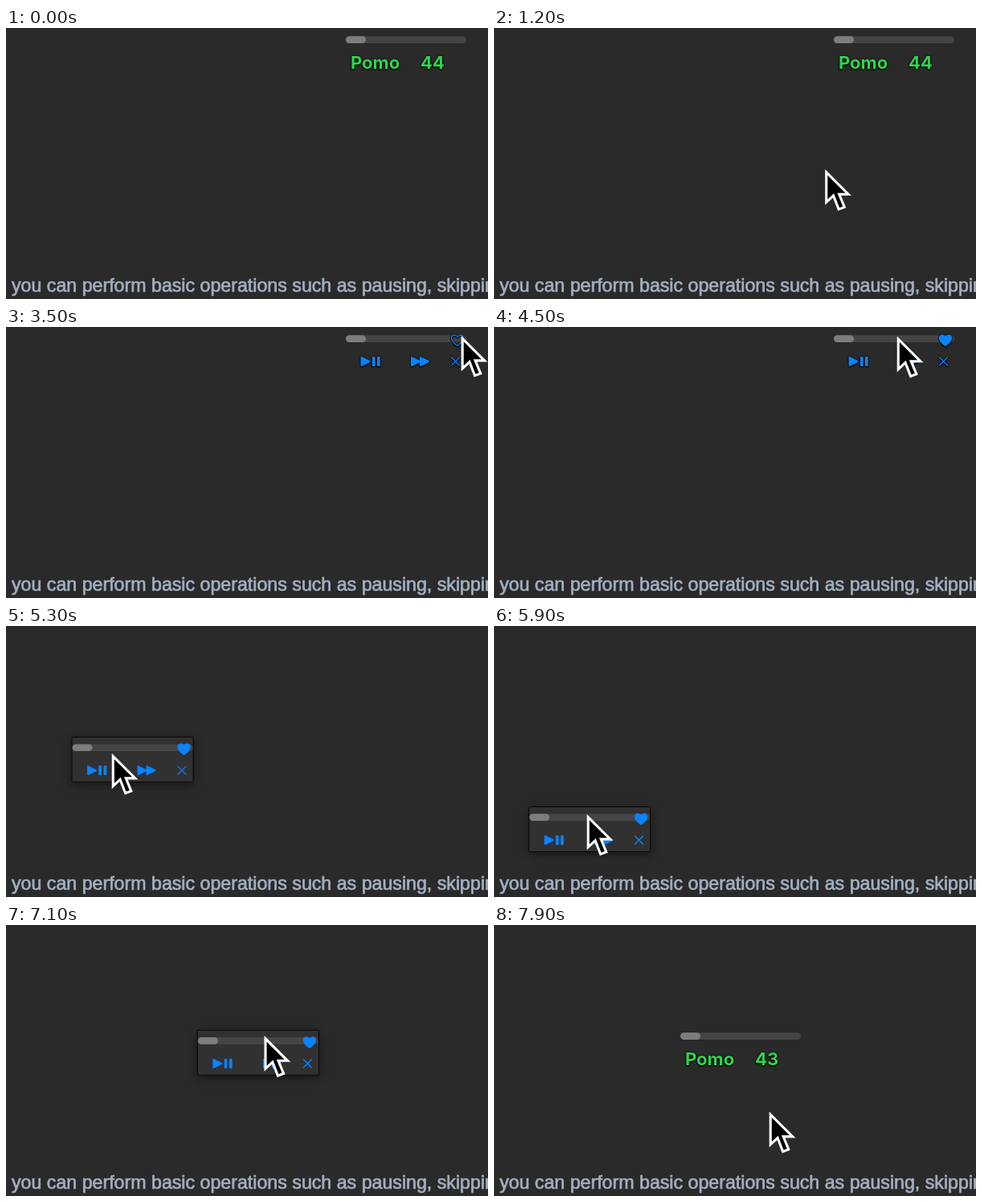
An HTML page that plays this animation: 600 by 338 pixels, repeating every 8 s.

```html
<!DOCTYPE html>
<html lang="en">
<head>
<meta charset="utf-8">
<title>Timer widget</title>
<style>
html, body { margin: 0; width: 100%; height: 100%; overflow: hidden; background: #2a2a2b; }
svg { display: block; width: 100vw; height: 100vh; }
#panel { fill: #313132; stroke: #080808; filter: drop-shadow(0 3px 6px rgba(0,0,0,.45)); }
#label { font: 700 22px Inter, sans-serif; fill: #30d54b; }
#icons { fill: #0a84ff; stroke: #0a84ff; stroke-width: 2; stroke-linejoin: round; stroke-linecap: round; }
#icons .thin { stroke-width: 1.3; }
#label, .bare { filter: drop-shadow(0 0 1px #000) drop-shadow(0 1px .6px #000); }
#caption { font: 23.2px "Liberation Sans", Arial, sans-serif; fill: #a3afc2; stroke: #a3afc2; stroke-width: .7; }
</style>
</head>
<body>
<svg viewBox="0 0 600 338">
  <text id="caption" x="7" y="329">you can perform basic operations such as pausing, skipping</text>
  <g id="widget">
    <rect id="panel" x=".5" y=".5" width="151" height="56" rx="1"/>
    <rect x="1" y="9.3" width="150" height="8.6" rx="4.3" fill="#454546"/>
    <rect x="1" y="9.3" width="25" height="8.6" rx="4.3" fill="#7d7d7e"/>
    <g id="label"><text x="7" y="49.5">Pomo</text><text id="count" x="94" y="49.5">44</text></g>
    <g id="icons">
      <path d="M20.500 37V47L30.500 42ZM34.800 37H36.500V47H34.800ZM41 37H42.700V47H41Z"/>
      <path d="M83 37V47L93 42ZM94 37V47L104 42Z"/>
      <path class="thin" d="M132.500 37L142.500 47M142.500 37L132.500 47"/>
      <path class="thin" id="heart" d="M140 22.500C135 19 132.500 16 132.500 13C132.500 8.500 138 7.800 140 11.500C142 7.800 147.500 8.500 147.500 13C147.500 16 145 19 140 22.500Z"/>
    </g>
  </g>
  <g id="cursor">
    <path d="M2 4V38L10 30.500L16 46L22.500 43.500L16.500 29H27Z" transform="scale(1.1)" stroke="#fff" stroke-width="2.8"/>
  </g>
</svg>
<script>
const $ = id => document.getElementById(id);
const LOOP = 8000, STEP = 100;

// Each move: start ms, end ms, then the place it eases to
const widget = {
  from: [422, 1],
  moves: [[4900, 5400, 42, 154], [5400, 5900, 43, 225], [5900, 6800, 275, 162], [6800, 7200, 231, 125]]
};
const cursor = {
  from: [300, 325],
  moves: [
    [800, 1600, 523, 26], [2200, 2300, 553, 13], [2300, 3500, 566, 10], [4000, 4700, 485, 11],
    [4900, 5400, 90, 175], [5400, 5900, 115, 234], [5900, 6800, 390, 145], [6800, 7200, 308, 136],
    [7700, 7900, 342, 232]
  ]
};

const ease = k => k * k * (3 - 2 * k);
const clamp = k => Math.min(1, Math.max(0, k));
const within = (t, from, to) => t >= from && t < to;

function place({ from, moves }, t) {
  return moves.reduce(([x, y], [start, end, toX, toY]) => {
    const k = ease(clamp((t - start) / (end - start)));
    return [x + (toX - x) * k, y + (toY - y) * k];
  }, from);
}
const show = (id, on) => $(id).setAttribute('visibility', on ? 'visible' : 'hidden');
const move = (id, p) => $(id).setAttribute('transform', `translate(${p})`);

function draw() {
  const t = Math.floor((performance.now() % LOOP + 8) / STEP) * STEP % LOOP;
  const hover = within(t, 1300, 7800);
  const framed = within(t, 1300, 3300) || within(t, 5000, 7300);
  move('widget', place(widget, t));
  move('cursor', place(cursor, t));
  show('cursor', t >= 800);
  show('panel', framed);
  show('icons', hover);
  show('label', !hover);
  $('icons').setAttribute('class', framed ? '' : 'bare');
  $('heart').setAttribute('fill', t >= 4200 ? '#0a84ff' : 'none');
  $('count').textContent = t < 4000 ? 44 : 43;
  requestAnimationFrame(draw);
}
draw();
</script>
</body>
</html>
```
